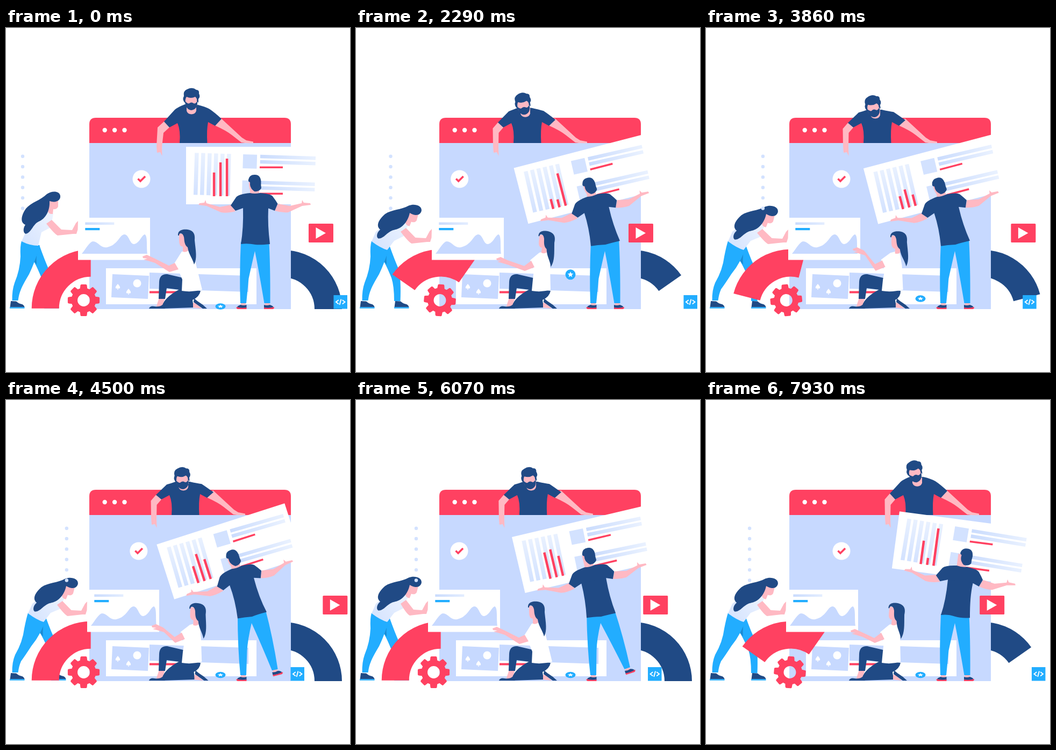
Write an HTML page with a canvas that moves like this. It is 640 px wide and 640 px high and loops after 8000 ms.

```html
<!DOCTYPE html>
<html lang="en">
<head>
<meta charset="utf-8">
<title>Team building a web page</title>
<style>
html, body { margin: 0; width: 100%; height: 100%; overflow: hidden; background: #fff; }
canvas { display: block; width: 100vw; height: 100vh; }
</style>
</head>
<body>
<canvas id="stage" width="640" height="640"></canvas>
<script>
const ctx = document.getElementById('stage').getContext('2d');
const LOOP = 8000;
const NAVY = '#204a85', RED = '#ff4161', LAV = '#c7d9ff', BLUE = '#22adff',
  SKIN = '#ffb9c3', PALE = '#d3e2ff', WHITE = '#fff';
const RAD = Math.PI / 180;

// Motion: eased steps and cosine waves, each between 0 and 1.
const smooth = u => { u = Math.min(1, Math.max(0, u)); return u * u * (3 - 2 * u); };
const ramp = (t, from, to) => smooth((t - from) / (to - from));
const wave = (t, period) => (1 + Math.cos(2 * Math.PI * t / period)) / 2;
// Start value plus eased moves [from, to, distance].
const travel = (t, start, ...moves) =>
  moves.reduce((sum, [from, to, dist]) => sum + dist * ramp(t, from, to), start);

function fill(color, d) {
  ctx.fillStyle = color;
  ctx.fill(new Path2D(d));
}
function line(color, width, d) {
  ctx.strokeStyle = color;
  ctx.lineWidth = width;
  ctx.stroke(new Path2D(d));
}
function rect(color, x, y, w, h) {
  ctx.fillStyle = color;
  ctx.fillRect(x, y, w, h);
}
function oval(color, x, y, r) {
  ctx.fillStyle = color;
  ctx.beginPath();
  ctx.arc(x, y, r, 0, 7);
  ctx.fill();
}
function group(x, y, deg, draw, sx = 1, sy = 1) {
  ctx.save();
  ctx.translate(x, y);
  ctx.rotate(deg * RAD);
  ctx.scale(sx, sy);
  draw();
  ctx.restore();
}
function fade(x0, y0, x1, y1, a, b) {
  const g = ctx.createLinearGradient(x0, y0, x1, y1);
  g.addColorStop(0, a);
  g.addColorStop(1, b);
  return g;
}

function quarterRing(color, x, y, from) {
  ctx.strokeStyle = color;
  ctx.lineWidth = 51;
  ctx.beginPath();
  ctx.arc(x, y, 84.5, from * RAD, (from + 90) * RAD);
  ctx.stroke();
}

function gear(s) {
  group(144.5 + 11.5 * s, 506.5, 95 * s, () => {
    ctx.strokeStyle = RED;
    ctx.lineWidth = 11.5;
    ctx.beginPath();
    ctx.arc(0, 0, 17.2, 0, 7);
    ctx.stroke();
    for (let i = 0; i < 8; i++) {
      fill(RED, 'M-7 -20L-6 -28Q-5.6 -29.6 -4 -29.6L4 -29.6Q5.6 -29.6 6 -28L7 -20Z');
      ctx.rotate(Math.PI / 4);
    }
  });
}

function browser() {
  rect(LAV, 155, 213, 375, 310);
  fill(RED, 'M155 214V179Q155 167 167 167H518Q530 167 530 179V214Z');
  for (let i = 0; i < 3; i++) oval(WHITE, 183.7 + 18.4 * i, 190, 4.2);
}

function spade(x, y) {
  group(x, y, 0, () => fill(WHITE,
    'M0 -5C2 -2 5 0 4 3Q2 4.5 .7 3V6H-.7V3Q-2 4.5 -4 3C-5 0 -2 -2 0 -5Z'));
}

function strip() {
  rect(WHITE, 186, 447, 280, 67);
  fill(LAV, 'M198 458L266 461L264 504L196 501Z');
  oval(WHITE, 244, 475, 7.5);
  spade(208, 481);
  spade(228, 490);
  fill(LAV, 'M267 455L451 461V491L267 485Z');
  rect(RED, 267, 489.5, 64, 4);
}

function star(t) {
  const y = travel(t, 518, [0, 1700, -66], [1700, 4500, 59.5]);
  group(399, y, 0, () => {
    oval(BLUE, 0, 0, 9.5);
    ctx.fillStyle = WHITE;
    ctx.beginPath();
    for (let i = 0; i < 10; i++) {
      const r = i % 2 ? 2.5 : 5.6, a = i * 36 * RAD;
      ctx.lineTo(r * Math.sin(a), -r * Math.cos(a));
    }
    ctx.fill();
  }, 1, 1 - .4 * ramp(y, 480, 511));
}

function check(t) {
  group(192 + 60 * smooth(wave(t, 3950)), 281, 0, () => {
    oval(WHITE, 0, 0, 16.5);
    line(RED, 3.6, 'M-6.5 -.5L-2 4L7 -5');
  });
}

function play(t) {
  const x = travel(t, 563, [0, 2150, -56], [2300, 4700, 84], [5210, 6600, -84],
    [6650, 7200, 84], [7250, 7950, -82]);
  group(x, 364, 0, () => {
    ctx.fillStyle = RED;
    ctx.beginPath();
    ctx.roundRect(0, 0, 46, 35, 1.5);
    ctx.fill();
    fill(WHITE, 'M13.5 7L32 17.5L13.5 28Z');
  });
}

function codeBadge(t) {
  const x = travel(t, 609.5, [3450, 4800, -91.5], [4880, 8340, 91.5]);
  group(x, 497, 0, () => {
    rect(BLUE, 0, 0, 25.5, 25.5);
    line(WHITE, 1.9, 'M9.3 9L4.5 12.7L9.3 16.4M14 7.5L11.2 18M16.2 9L21 12.7L16.2 16.4');
  });
}

function dots(t) {
  const x = travel(t, 31, [480, 4610, 82], [5730, 10900, -82]);
  for (let i = 0; i < 6; i++) oval(PALE, x, 238.7 + 19.35 * i, 3.2);
}

function topMan(t) {
  const x = travel(t, 0, [1100, 2290, -30], [3900, 5100, 30], [5300, 6600, -30], [6700, 7900, 78]);
  const sink = travel(t, 0, [800, 1300, 13], [2050, 2650, -13], [3400, 3860, 13], [7300, 8000, -13]);
  const tilt = travel(t, 0, [300, 1000, -9], [3900, 5100, 9], [5300, 6500, -10]);
  const h = 5 * ramp(t, 0, 1000);
  const n = sink * .7, m = sink * .4, e = sink * .2, b = sink * .62;
  group(x, 0, 0, () => {
    fill(SKIN, `M294 ${174 + e}L305 184L${293 + h / 2} 195L${290 + h} 222L${290.5 + h} 238L${287 + h} 231L${281 + h} 232L${280 + h} 220L${282 + h / 2} ${185 + e}Z`);
    fill(SKIN, 'M400 168L388 181Q410 191 420 199L438 213Q448 215 460 214V211.5L447 209L439 204Z');
    fill(NAVY, `M333 ${142 + n}Q320 ${147 + n} 314 ${152 + m}L294 ${174 + e}L304 185L319 177Q325 190 323 214H374.5Q373 190 376 175L389 182L401 ${169 + e}Q388 ${157 + m} 379 ${151 + m}Q370 ${146 + n} 357 ${143 + n}Z`);
    fill(SKIN, `M336 ${144 + b}H354V${154 + b}Q352 ${160.5 + b} 345 ${160.5 + b}Q338 ${160.5 + b} 336 ${154 + b}Z`);
  });
  group(345 + x + tilt * .2, 146 + sink, tilt, () => {
    fill(SKIN, 'M-11 -20H11V-3Q8 4 0 4Q-9 4 -11 -4Z');
    fill(NAVY, 'M-12 -10Q-6 -4 -4 -6Q0 -9 4 -6Q7 -4 11 -10Q12 5 0 7Q-11 6 -12 -10Z');
    fill(NAVY, 'M-14 -9Q-17 -15 -14 -19Q-16 -29 -8 -32Q2 -37 9 -31Q15 -31 14 -24Q17 -18 13 -14L13 -7L10 -10Q11 -15 7 -18Q-1 -14 -9 -18Q-12 -15 -11 -6Z');
  });
}

function board(t) {
  rect(WHITE, -128, -106, 250, 107);
  group(-3, -52.5, 1.7, () => {
    const column = fade(0, -40, 0, 38, '#e9f1ff', PALE);
    const soft = fade(9, 0, 112, 0, '#c9dbfd', '#e9f1ff');
    for (let i = 0; i < 6; i++) rect(column, -110 + 12 * i, -39, 7.5, 78);
    for (const y of [-39, 9.5]) {
      rect(PALE, -20, y, 26, 26);
      rect(soft, 12, y, 103, 6.5);
      rect(soft, 12, y + 10, 103, 6.5);
    }
  });
  rect(RED, 9, -69.5, 43, 3.5);
  rect(RED, 9, -20.5, 43, 3.5);
  const heights = [18 + 34 * wave(t + 1260, 7900), 13 + 50 * wave(t, 5300), 21 + 49 * wave(t, 2640)];
  heights.forEach((h, i) => rect(RED, -78.2 + 12 * i, -14 - h, 4.5, h));
}

function shoe(x, y, deg, side) {
  group(x, y, deg, () => {
    rect(SKIN, -4.5, -4, 9, 9);
    fill(NAVY, 'M-6 3Q-1 5 5 3Q12 5 12 9H-6Z');
    fill(RED, 'M-6 8Q3 10 13 7Q13 11 10 11H-6Z');
  }, side);
}

function boardMan(t) {
  const step = ramp(t, 4000, 5100) - ramp(t, 5210, 7100);
  const deg = travel(t, 0, [400, 2450, -14.8], [4000, 5100, -7], [5210, 7630, 29.4]);
  const nod = 6 * ramp(t, 5300, 6640);
  const mx = 463 + 1.3 * deg - 12 * step;
  const my = 327 + .28 * Math.abs(deg) - 3.5 * step;
  const wx = 464 - 14 * step;
  const fx = 486 + 33 * step, fy = 512 - 23 * step, turn = -32 * step;
  const c = Math.cos(deg * RAD), s = Math.sin(deg * RAD);
  const spot = (x, y) => [mx + x * c - y * s, my + x * s + y * c];

  group(mx, my, deg, () => board(t));

  // legs
  shoe(441.5, 512, 0, -1);
  shoe(fx, fy, turn, 1);
  const ex = 5.5 * Math.cos(turn * RAD), ey = 5.5 * Math.sin(turn * RAD);
  const kx = (wx + fx) / 2;
  fill(BLUE, `M${wx - 27} 398L${wx + 2} 398L${wx - 1} 415Q${wx - 8} 445 ${wx / 2 + 219.5} 466L447 512H436Q${wx / 2 + 202} 460 ${wx - 27} 398Z`);
  fill(BLUE, `M${wx - 8} 402L${wx + 25} 391Q${kx + 17} 440 ${fx + ex} ${fy + ey}L${fx - ex} ${fy - ey}Q${kx - 4} 455 ${wx - 1} 415Z`);

  // torso
  const dip = -deg * .42;
  const left = spot(-22, 8), right = spot(25, 9);
  const hipL = wx - 27, hipR = wx + 27;
  fill(NAVY, `M${spot(-30, -10)}L${spot(32, -10)}L${right}Q${(right[0] + hipR) / 2 - 3} 366 ${hipR} ${402 - dip}Q${wx + 10} ${404 - dip * .7} ${wx} 403Q${wx - 15} ${400 + dip * .6} ${hipL} ${402 + dip * .6}Q${(left[0] + hipL) / 2 + 3} 372 ${left}Z`);

  group(mx, my, deg, () => {
    fill(SKIN, 'M-45 2L-36 14Q-52 18 -63 16L-90 4L-105 2L-103 -1L-94 -2L-92 -7L-90 -1L-65 6Z');
    fill(SKIN, 'M43 0L37 13Q50 17 62 16L88 4L104 2L103 -1L91 -2L88 -7L87 -1L65 4Z');
    fill(SKIN, 'M-9 -42H8V-18H-9Z');
    fill(NAVY, 'M-9 -20Q0 -18 9 -20Q28 -19 33 -14Q39 -6 42.5 0L37 13L24 8L-22 8L-36 13L-45 3L-35 -12Q-30 -18 -9 -20Z');
    group(nod - 1, -38, nod, () => {
      fill(SKIN, 'M-10 -5Q-11 8 -7 14L2 13V-5Z');
      fill(NAVY, 'M-11 -7Q-9 -16 0 -16Q11 -17 12.5 -4Q12 3 13 9Q9 16 0 15Q-7 10 -8 3L-8 -2Q-12 -3 -11 -7Z');
    });
  });
}

// How far the card has been pushed, and whether the pusher has stepped forward.
const pushed = t => travel(t, 0, [0, 900, 7], [2640, 3430, 12], [3900, 5100, -4],
  [5210, 6000, -15], [6930, 7710, 15]);
const stride = t => travel(t, 0, [2640, 3430, 1], [5210, 6000, -1], [6930, 7710, 1]);

function card(t) {
  group(134 + pushed(t), 353, 0, () => {
    rect(WHITE, 0, 0, 134, 78.5);
    rect(fade(13, 0, 67, 0, '#c9dbfd', '#e3edff'), 13.3, 8.5, 54, 4.6);
    rect(BLUE, 13.3, 19, 27, 4.2);
    fill(LAV, 'M7 67C15 57 22 44 28 44C37 44 42 57 54 55C74 51 77 32 86 31C95 31 96 49 104 49C114 48 118 33 124 31C130 33 127 55 129 67Z');
  });
}

function flatShoe(x) {
  group(x, 0, 0, () => {
    fill(NAVY, 'M2 508L12 508.5Q17 513 23 514Q27 516 27.5 519.5H0.5Z');
    rect(BLUE, 0, 519.3, 27.5, 2.4);
  });
}

function pusherLegs(t) {
  const q = stride(t), k = 12 * q, r = 13 * q;
  flatShoe(71 + r);
  flatShoe(7);
  fill(BLUE, `M${40 + k} 402L${62 + k} 404Q${72 + k} 432 ${80 + r} 450Q${84 + r} 470 ${82.5 + r} 508H${71 + r}Q${71 + r} 480 ${66 + r} 465Q${56 + k} 440 ${49 + k} 430Z`);
  fill('#1b8bd3', `M${62 + k} 404Q${55 + k} 418 ${57 + k} 440L${49 + k} 430L${53 + k} 410Z`);
  fill(BLUE, `M${29 + k} 396L${63 + k} 405Q${54 + k} 435 ${43 + 4 * q} 458Q${31 + 3 * q} 478 28 486Q24 495 22.5 507H11.5Q11 488 ${16 + q} 474Q${26 + 5 * q} 450 ${27 + 7 * q} 425Q${26 + k} 405 ${29 + k} 396Z`);
}

function pusher(t) {
  const lean = ramp(t, 0, 900);
  const q = stride(t), k = 12 * q;
  const hand = 134 + pushed(t), hy = 360 + 15 * lean + q;
  const sx = 80 + 8 * lean + k, sy = 360 + 15 * lean + 2 * q;
  const ex = (sx + hand) / 2 - 9, ey = hy + 21;
  const shade = fade(30 + k, 400, 95 + k, 350, '#d6e4fe', '#eef4ff');

  fill(shade, `M${76 + 14 * lean + k} ${341 + 13 * lean}Q${45 + 8 * lean + k} ${350 + 15 * lean} ${39 - 2 * lean + k} ${374 + 5 * lean}L${29 + k} 397Q${45 + k} ${405 + 4 * lean} ${60 - 2 * lean + k} ${405 + 8 * lean}L${66 + 5 * lean + k} ${380 + 16 * lean}L${sx + 5} ${sy + 10}L${sx + 6} ${sy - 3}Q${87 + 15 * lean + k} ${352 + 10 * lean} ${88 + 13 * lean + k} ${345 + 12 * lean}Z`);
  fill(SKIN, `M${sx - 5} ${sy + 4}L${sx + 5} ${sy - 3}L${ex + 5} ${ey - 6}L${hand - 11} ${hy + 16}L${hand - 4} ${hy + 3}L${hand} ${hy - 1}L${hand - .5} ${hy + 15}L${hand - 3} ${hy + 23}L${hand - 9} ${hy + 23}L${ex - 2} ${ey + 5}Q${ex - 8} ${ey + 2} ${sx - 5} ${sy + 4}Z`);

  group(91 + 21 * lean + k, 313 + 25 * lean + 2 * q, 15 * lean, () => {
    fill(SKIN, 'M-10 8L6 8L6 19Q4 25 -3 24L-4 33Q-12 34 -14 26Z');
    fill(NAVY, 'M-10 9C2 13 11 8 10 -1C8 -11 -7 -10 -15 -4C-27 8 -44 11 -54 23C-63 36 -65 49 -55 53C-60 60 -59 69 -54 70C-43 67 -42 53 -30 47C-18 42 -9 28 -10 9Z');
  });
}

function kneeler(t) {
  const push = pushed(t);
  const lean = smooth(push / 7), strain = ramp(push, 15, 19);
  const k = lean + .15 * strain, r = 5 * strain;
  const lift = 4 * lean - 18 * strain;
  const x = 255 + push, y = 427 + lift, ex = 303 + 10 * k;

  // legs
  fill(SKIN, 'M285 502H296L290 520H279Z');
  fill(NAVY, 'M284 504L285 472Q286 457 300 458L330 465V488L299 484L296 504Z');
  fill(NAVY, 'M266 522Q268 516 277 518Q286 519 291 515L296 522Z');
  fill(NAVY, `M325 485L362 489Q${360 + r / 2} 500 ${347 + r} 506L${349 + r} 520L290 522Q290 503 325 485Z`);
  fill(SKIN, `M${348 + r} 511L${353 + r} 512L${364 + r} 522L${348 + r} 520Z`);
  fill(NAVY, `M${350 + r} 503L${356 + r} 508Q${366 + r} 514 ${374 + r} 522H${366 + r}L${349 + r} 510Z`);

  // torso and arm
  fill(WHITE, `M${327 + 14 * k} ${416 + 2 * k}L${341 + 16 * k} 414Q${352 + 9 * k} ${430 - 2 * k} ${354 + 7 * k + r / 2} 442L${365 - 3 * k + r} 487Q345 492 327 489L${328 + k} 468L${321 + 10 * k} 451L${313 + 11 * k} ${438 - 6 * k}Z`);
  fill(SKIN, `M${x - 1} ${y - 2}L${x + 7} ${y - 5}L${x + 20} ${y + 1}L${ex} ${442 + lift / 5}L${314 + 12 * k} ${437 - 4 * k}L${321 + 11 * k} ${449 - 4 * k}L${ex + 1} ${454 - k * 2}L${x + 22} ${y + 10}L${x + 9} ${y + 6}L${x + 1} ${y + 4}L${x + 8} ${y + 2}L${x} ${y + 1}Z`);

  group(335 + 20 * k, 380 + 3 * k, 7 * k - 1.5 * r, () => {
    fill(SKIN, 'M-13 3H0L4 34Q0 38 -6 36L-6 27Q-13 27 -13 15Z');
    fill(NAVY, 'M-15 6C-16 -5 -4 -6 3 -5C15 -3 17 5 16 15C18 35 21 48 15 60C12 48 5 42 3 28C-4 23 -3 14 -4 9Q-6 2 -10 2Q-13 2 -13 6Z');
  });
}

function draw(t) {
  rect(WHITE, 0, 0, 640, 640);
  const beat = t % 5640;
  const swing = ramp(beat, 542, 1892) - ramp(beat, 3110, 4460);

  quarterRing(NAVY, 515, 523, -90 - 35 * swing);
  browser();
  check(t);
  strip();
  star(t);
  topMan(t);
  play(t);
  codeBadge(t);
  boardMan(t);
  pusherLegs(t);
  quarterRing(RED, 157.7, 521.7, 180 + 35 * swing);
  gear(swing);
  card(t);
  pusher(t);
  kneeler(t);
  dots(t);
}

function tick() {
  draw(performance.now() % LOOP);
  requestAnimationFrame(tick);
}
tick();
</script>
</body>
</html>
```
